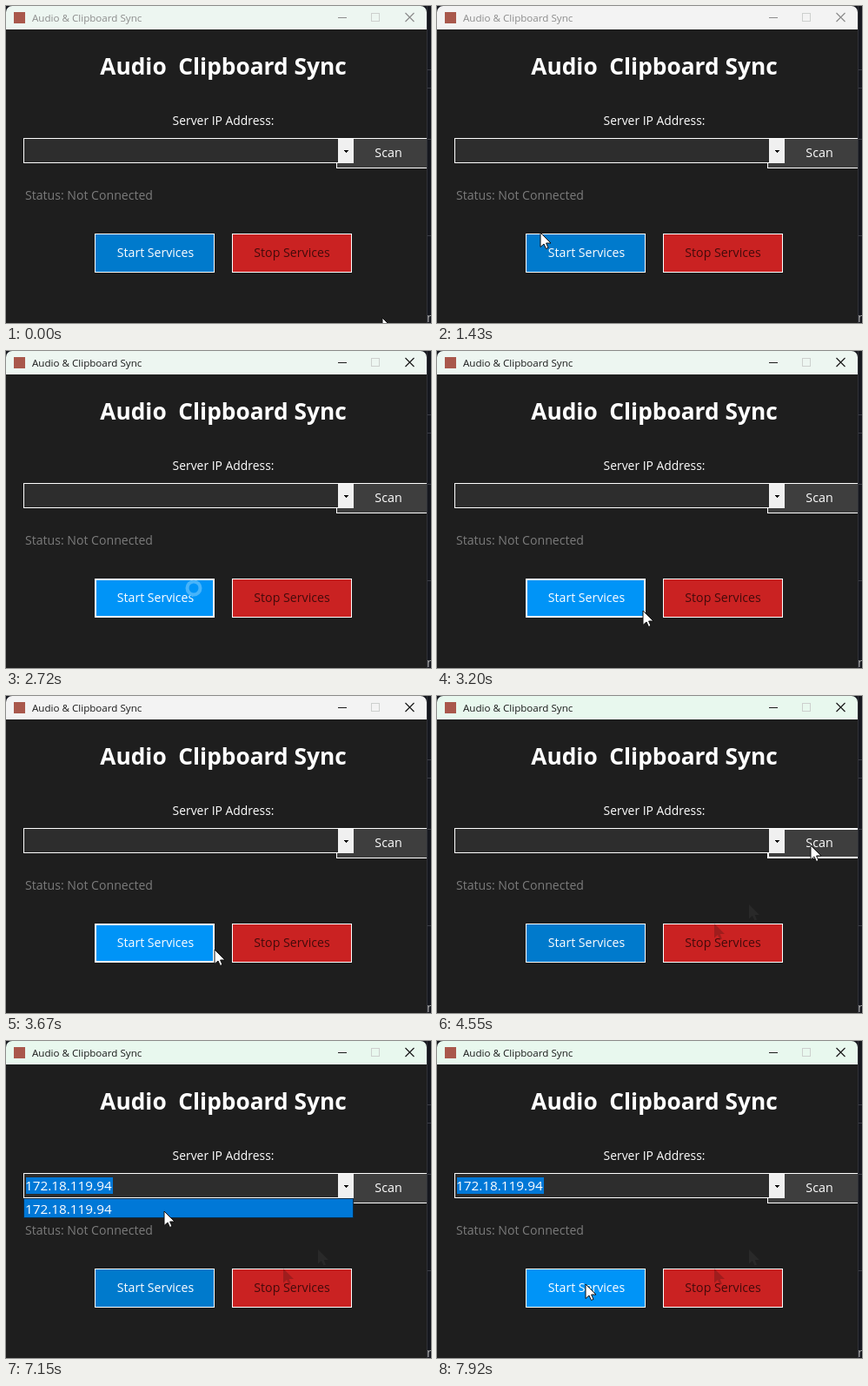
An HTML page with a canvas that plays this animation: 489 by 365 pixels, repeating every 7.99 s.

```html
<!DOCTYPE html>
<html lang="en">
<head>
<meta charset="utf-8">
<title>Audio &amp; Clipboard Sync</title>
<style>
  html, body { margin: 0; width: 100%; height: 100%; overflow: hidden; background: #15171e; }
  canvas { display: block; }
</style>
</head>
<body>
<canvas id="stage" width="489" height="365"></canvas>
<script>
const ctx = document.getElementById('stage').getContext('2d');
const LOOP = 7990;
const FONT = '"Open Sans", "Noto Sans", sans-serif';
const IP = '172.18.119.94';

// Moments when the interface changes, in ms
const ACTIVATE = 2650, SCAN = 4420, FOUND = 5080, OPEN = 6050, PICK = 7240;

const entry = { x: 433, y: 359 };
const moves = [
  { from: 250, to: 1000, x: 238, y: 266 },
  { from: 1070, to: 1430, x: 119, y: 261 },
  { from: 1430, to: 1570, x: 132, y: 221 },
  { from: 1830, to: 2170, x: 404, y: 197 },
  { from: 2170, to: 2520, x: 214, y: 268 },
  { from: 2720, to: 3340, x: 240, y: 292, bow: 15 },
  { from: 3670, to: 4290, x: 430, y: 172, bow: 18 },
  { from: 4700, to: 5150, x: 360, y: 221 },
  { from: 5220, to: 5500, x: 380, y: 167 },
  { from: 5640, to: 5920, x: 386, y: 166 },
  { from: 6320, to: 6750, x: 182, y: 196 },
  { from: 7220, to: 7900, x: 171, y: 280 }
];

const between = (t, a, b) => t >= a && t < b;

function pointerAt(t) {
  let { x, y } = entry;
  for (const move of moves) {
    if (t < move.from) break;
    const k = Math.min(1, (t - move.from) / (move.to - move.from));
    const eased = k * k * (3 - 2 * k);
    x += (move.x - x) * eased;
    y += (move.y - y) * eased + (move.bow || 0) * Math.sin(Math.PI * k);
  }
  return [Math.round(x), Math.round(y)];
}

function rect(x, y, w, h, color) {
  ctx.fillStyle = color;
  ctx.fillRect(x, y, w, h);
}

function box(x, y, w, h, fill, border = 1, edge = '#fff') {
  rect(x, y, w, h, edge);
  rect(x + border, y + border, w - 2 * border, h - 2 * border, fill);
}

function text(str, x, y, size, color, align = 'left', weight = 400) {
  ctx.font = `${weight} ${size}px ${FONT}`;
  ctx.textAlign = align;
  ctx.fillStyle = color;
  ctx.fillText(str, x, y);
}

function arrow(x, y, fill, outline) {
  const shape = [[0, 0], [0, 16.5], [4, 13], [6.5, 18.5], [9, 17.4], [6.6, 12], [12, 12]];
  ctx.beginPath();
  shape.forEach(([dx, dy]) => ctx.lineTo(x + dx, y + dy));
  ctx.closePath();
  ctx.fillStyle = fill;
  ctx.fill();
  if (!outline) return;
  ctx.strokeStyle = outline;
  ctx.lineWidth = 1;
  ctx.stroke();
}

function beam(x, y) {
  for (const [pad, color] of [[1, '#d8d8d8'], [0, '#111']]) {
    const bar = (dx, dy, w, h) =>
      rect(x + dx - pad, y + dy - pad, w + 2 * pad, h + 2 * pad, color);
    bar(0, -7, 1, 15);
    bar(-2, -7, 5, 1);
    bar(-2, 7, 5, 1);
  }
}

function busyRing(x, y) {
  ctx.strokeStyle = '#48b4fa';
  ctx.lineWidth = 4;
  ctx.beginPath();
  ctx.arc(x, y, 7.5, 0, Math.PI * 2);
  ctx.stroke();
}

function backdrop() {
  rect(0, 0, 489, 365, '#15171e');
  rect(484, 0, 1, 365, '#303238');
  for (const y of [73, 94, 153, 264]) rect(485, y, 4, 1, '#3a3c44');
  text('n', 484, 364, 15, '#b0b0b0');
}

function titleBar(t) {
  const ink = t >= ACTIVATE ? '#1a1a1a' : '#8c8c8c';
  const plain = between(t, 70, ACTIVATE) || between(t, 3340, 3960);
  ctx.fillStyle = plain ? '#f3f3f3' : t < 3340 ? '#edf6f1' : '#e8f8ee';
  ctx.beginPath();
  ctx.roundRect(0, 0, 484, 27, [7, 7, 0, 0]);
  ctx.fill();
  rect(9, 7, 13, 13, '#a9584c');
  text('Audio & Clipboard Sync', 30, 18, 11.6, ink);

  rect(382, 13, 10, 1, ink);
  ctx.lineWidth = 1;
  ctx.strokeStyle = '#cdd0ce';
  ctx.strokeRect(420.5, 8.5, 9, 9);
  ctx.lineWidth = 1.2;
  ctx.strokeStyle = ink;
  ctx.beginPath();
  for (const side of [-5, 5]) {
    ctx.moveTo(464.5 - side, 8);
    ctx.lineTo(464.5 + side, 18);
  }
  ctx.stroke();
}

function scanButton(t) {
  const border = between(t, SCAN, OPEN) ? 2 : 1;
  box(380, 152, 110, 35, '#3e3e3e', border);
  text('Scan', 440, 174, 14.3, '#fff', 'center');
}

function comboBox(t) {
  box(20, 152, 380, 29, '#2d2d2d');
  rect(382, 153, 18, 28, '#f0f0f0');
  for (let row = 0; row < 3; row++) rect(389 + row, 166 + row, 5 - 2 * row, 1, '#000');
  if (t >= OPEN) rect(23, 157, 100, 19, '#0078d7');
  if (t >= FOUND) text(IP, 22, 172, 15.3, '#fff');
  if (!between(t, OPEN, PICK)) return;
  box(20, 181, 380, 23, '#0078d7', 1, '#0a2c48');
  text(IP, 22, 199, 15.3, '#fff');
}

function serviceButtons(t, x, y) {
  const hover = between(x, 102, 241) && between(y, 262, 307);
  const held = between(t, ACTIVATE, 3700);
  const border = between(t, ACTIVATE, SCAN) ? 2 : 1;
  box(102, 262, 138, 45, hover || held ? '#0094f7' : '#007acc', border);
  text('Start Services', 172, 289, 14.1, '#fff', 'center');
  box(260, 262, 138, 45, '#ca2222');
  text('Stop Services', 329, 289, 14.2, '#430b0b', 'center');
}

function trails(t) {
  if (t > 3970) arrow(319, 262, 'rgba(40,15,15,.26)');
  if (t > 4150) arrow(359, 240, 'rgba(255,255,255,.05)');
}

function pointer(t, x, y) {
  if (between(t, ACTIVATE, 2800)) busyRing(216, 273);
  else if (between(t, 5430, 5700)) beam(x, y);
  else arrow(x, y, '#fff', '#111');
}

function draw(t) {
  const [x, y] = pointerAt(t);
  backdrop();
  ctx.save();
  ctx.beginPath();
  ctx.rect(0, 0, 484, 365);
  ctx.clip();
  rect(0, 27, 484, 338, '#1e1e1e');
  titleBar(t);
  text('Audio  Clipboard Sync', 250, 79, 26.3, '#fff', 'center', 700);
  text('Server IP Address:', 250, 137, 13.9, '#fff', 'center');
  text('Status: Not Connected', 22, 223, 14.1, '#7c7c7c');
  scanButton(t);
  comboBox(t);
  serviceButtons(t, x, y);
  trails(t);
  ctx.restore();
  pointer(t, x, y);
}

const start = performance.now();
function tick() {
  draw((performance.now() - start) % LOOP);
  requestAnimationFrame(tick);
}
tick();
</script>
</body>
</html>
```
